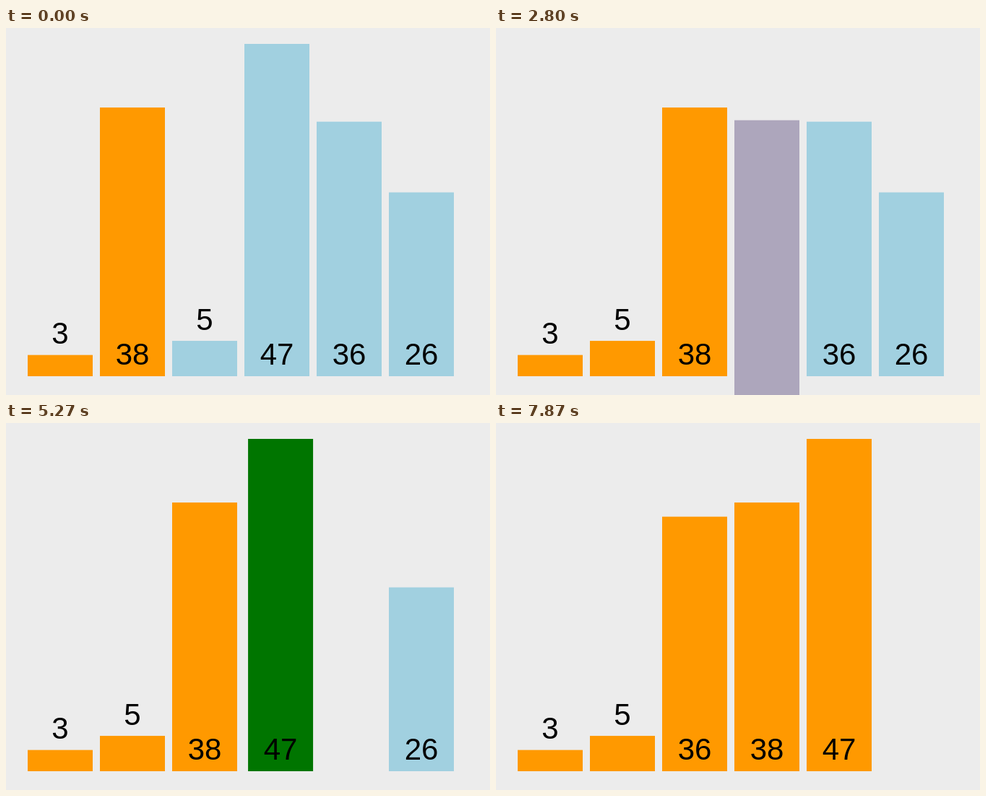
Write an HTML page that moves like this. It is 670 px wide and 508 px high and loops after 8 s.

```html
<!DOCTYPE html>
<html lang="en">
<head>
<meta charset="utf-8">
<title>Insertion sort</title>
<style>
  html, body { margin: 0; width: 100%; height: 100%; overflow: hidden; background: #ececec; }
  svg { display: block; width: 670px; height: 508px; }
  text { font: 42px "Liberation Sans", Arial, sans-serif; text-anchor: middle; fill: #000; }
</style>
</head>
<body>
<svg id="stage" viewBox="0 0 670 508"></svg>
<script>
const LOOP = 8000, FPS = 15;
const FIRST = 213, STEP = 500, MOVE = 230;
const BASE = 482, UNIT = 460 / 47, DROP = 488;
const BLUE = [161, 208, 224], ORANGE = [255, 153, 0], GREEN = [0, 117, 0], RED = [215, 15, 56];
const values = [3, 38, 5, 47, 36, 26];
const SORTED = 2;

// Run the sort once and record the look of every bar after each step.
function record() {
  const bars = values.map((v, i) => ({ slot: i, y: 0, color: i < SORTED ? ORANGE : BLUE }));
  const order = bars.slice();
  const states = [];
  const save = () => states.push(bars.map(b => ({ ...b })));
  const valueOf = b => values[bars.indexOf(b)];
  save();
  for (let i = SORTED; i < order.length; i++) {
    const key = order[i];
    key.y = DROP;
    key.color = RED;
    save();
    let j = i - 1, last = null;
    for (; j >= 0; j--) {
      const other = order[j];
      if (last) last.color = ORANGE;
      other.color = GREEN;
      last = other;
      save();
      if (valueOf(other) <= valueOf(key)) break;
      order[j] = key;
      order[j + 1] = other;
      other.slot++;
      key.slot--;
      save();
    }
    last.color = ORANGE;
    key.y = 0;
    key.color = ORANGE;
    save();
  }
  return states;
}

function node(name, attrs, parent) {
  const el = document.createElementNS("http://www.w3.org/2000/svg", name);
  for (const k in attrs) el.setAttribute(k, attrs[k]);
  return parent.appendChild(el);
}

const stage = document.getElementById("stage");
const states = record();
const views = values.map(v => {
  const h = v * UNIT;
  const group = node("g", {}, stage);
  const rect = node("rect", { y: -h, width: 90, height: h }, group);
  const label = node("text", { x: 45, y: h < 60 ? -h - 15.5 : -16 }, group);
  label.textContent = v;
  return { group, rect };
});

const ease = t => t < 0.5 ? 4 * t ** 3 : 1 - 4 * (1 - t) ** 3;
const mix = (a, b, k) => a + (b - a) * k;

function draw(time) {
  const step = Math.max(0, Math.floor((time - FIRST) / STEP));
  const t = (time - FIRST - step * STEP) / MOVE;
  const k = ease(Math.min(1, Math.max(0, t)));
  views.forEach(({ group, rect }, i) => {
    const a = states[step][i], b = states[step + 1][i];
    const x = 30 + 100 * mix(a.slot, b.slot, k);
    const y = BASE + mix(a.y, b.y, k);
    group.setAttribute("transform", `translate(${x} ${y})`);
    rect.setAttribute("fill", `rgb(${a.color.map((c, n) => Math.round(mix(c, b.color[n], k)))})`);
  });
}

// The picture advances at 15 frames per second.
const tick = 1000 / FPS;
const start = performance.now();
function loop(now) {
  const time = Math.max(0, now - start) % LOOP;
  draw(Math.min(LOOP - tick, Math.floor((time + 5) / tick) * tick));
  requestAnimationFrame(loop);
}
draw(0);
requestAnimationFrame(loop);
</script>
</body>
</html>
```
